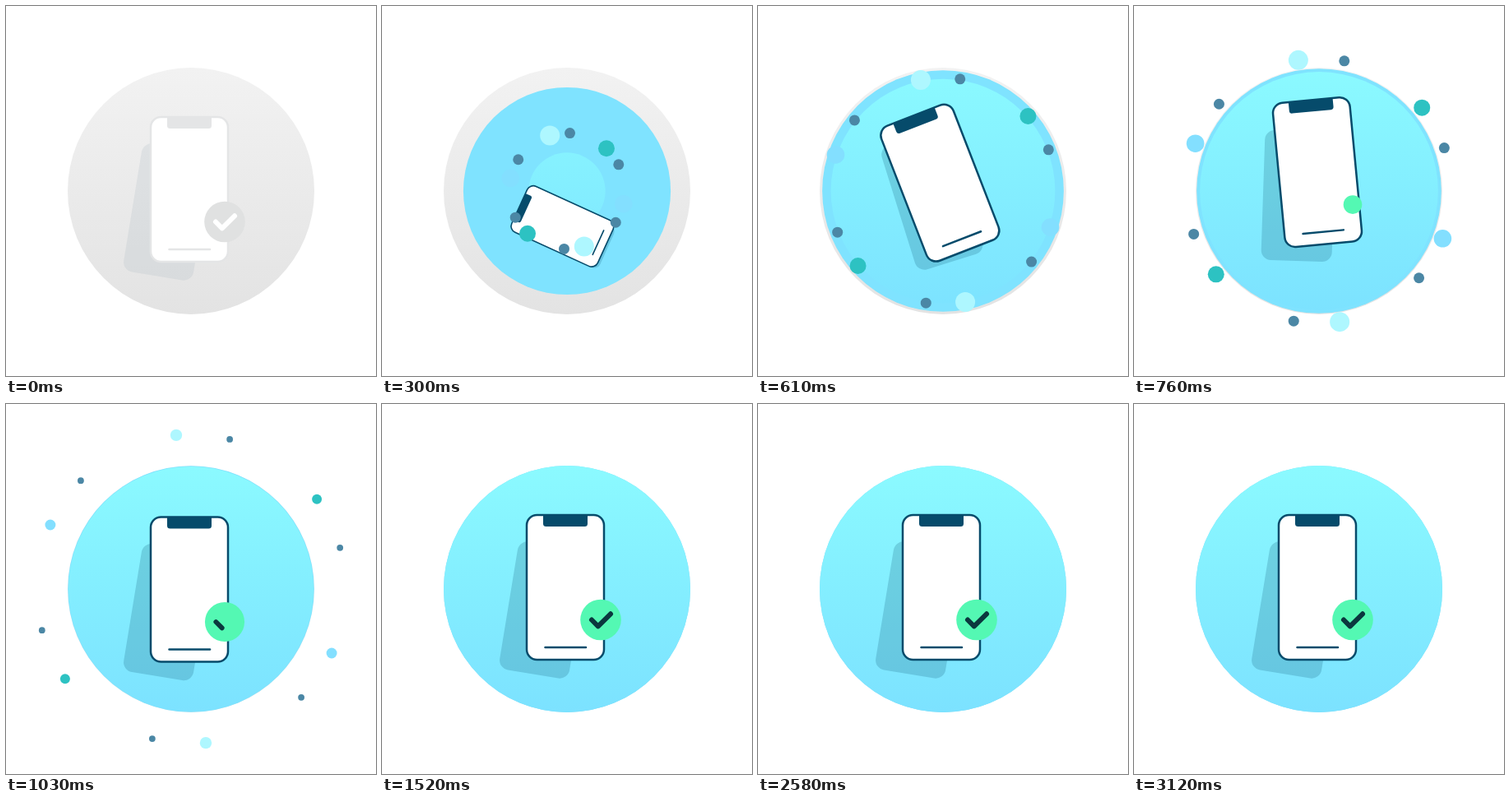
Recreate the animation shown at these times as an HTML page with a canvas. Size 450 by 450 pixels, loop 3210 ms.

```html
<!DOCTYPE html>
<html lang="en">
<head>
<meta charset="utf-8">
<title>Phone check</title>
<style>
html, body { margin: 0; width: 100%; height: 100%; overflow: hidden; background: #fff; }
canvas { display: block; }
</style>
</head>
<body>
<canvas id="stage" width="450" height="450"></canvas>
<script>
const LOOP = 3210;
const C = 225;
const ctx = document.getElementById('stage').getContext('2d');

const COLOR = { ink: '#064b6b', shadow: 'rgba(6,75,107,.2)', badge: '#54f8b3', tick: '#0b383e' };
const GREY = { ink: '#e4e5e6', shadow: 'rgba(170,180,190,.22)', badge: '#e0e1e1', tick: '#fff' };

// Motion curves: [time, value] pairs joined by smooth splines
const PHONE_Y = [[150, 285], [450, 240], [700, 203], [760, 202], [1030, 225.5], [1200, 223]];
const PHONE_TURN = [[150, -80], [450, -42], [760, -5.5], [1000, 0]];
const PHONE_SIZE = [[150, 0], [400, 1]];
const SHADOW_X = [[200, 3], [450, 1.5], [760, -23], [1000, -26.5]];
const SHADOW_Y = [[200, 6], [450, 10], [760, 29], [1000, 27.5]];
const SHADOW_TURN = [[150, -80], [450, -42], [760, 1.8], [1030, 9.3]];
const BADGE_SIZE = [[700, 0], [760, .45], [870, 1.03], [1030, .97], [1110, 1]];
const STREAK = [[340, 0], [440, .65], [600, 0]];

// Half of the ring of dots: angle, radius, colour; the other half is opposite
const DOTS = [
  [-99, 12, '#aef7ff'], [-79, 6.5, '#4b87a5'], [-39, 10, '#2dc2c2'],
  [-19, 6.5, '#4b87a5'], [21, 10.8, '#83dfff'], [41, 6.5, '#4b87a5']
];

const clamp = v => Math.min(1, Math.max(0, v));
const rad = deg => deg * Math.PI / 180;

function curve(keys, t) {
  const last = keys.length - 1;
  if (t <= keys[0][0]) return keys[0][1];
  if (t >= keys[last][0]) return keys[last][1];
  const i = keys.findIndex(k => k[0] > t) - 1;
  const slope = j => j === 0 || j === last ? 0
    : (keys[j + 1][1] - keys[j - 1][1]) / (keys[j + 1][0] - keys[j - 1][0]);
  const [t0, a] = keys[i], [t1, b] = keys[i + 1];
  const d = t1 - t0, u = (t - t0) / d, v = 1 - u;
  return a * (1 + 2 * u) * v * v + b * u * u * (3 - 2 * u)
    + d * u * v * (slope(i) * v - slope(i + 1) * u);
}

function disc(x, y, r, fill) {
  if (r <= 0) return;
  ctx.fillStyle = fill;
  ctx.beginPath();
  ctx.arc(x, y, r, 0, 2 * Math.PI);
  ctx.fill();
}

function box(x, y, w, h, r, fill) {
  ctx.fillStyle = fill;
  ctx.beginPath();
  ctx.roundRect(x, y, w, h, r);
  ctx.fill();
}

function line(points, width, color) {
  ctx.strokeStyle = color;
  ctx.lineWidth = width;
  ctx.beginPath();
  points.forEach(([x, y]) => ctx.lineTo(x, y));
  ctx.stroke();
}

function placed(x, y, turn, size, draw) {
  if (size <= 0) return;
  ctx.save();
  ctx.translate(x, y);
  ctx.rotate(rad(turn));
  ctx.scale(size, size);
  draw();
  ctx.restore();
}

function gradient(top, bottom) {
  const g = ctx.createLinearGradient(0, 75, 0, 375);
  g.addColorStop(0, top);
  g.addColorStop(1, bottom);
  return g;
}

function drawPhone(t, look) {
  const y = curve(PHONE_Y, t), size = curve(PHONE_SIZE, t);

  placed(223 + curve(SHADOW_X, t), y + curve(SHADOW_Y, t), curve(SHADOW_TURN, t), size,
    () => box(-43, -79, 86, 158, 12, look.shadow));

  const streak = curve(STREAK, t);
  if (streak > 0) {
    const color = `rgba(190,248,255,${streak})`;
    line([[174, 288], [168, 319]], 8, color);
    line([[201, 306], [205, 331]], 8, color);
  }

  const x = curve([[450, 219.5], [760, 223]], t);
  placed(x, y, curve(PHONE_TURN, t), size, () => {
    box(-47, -88, 94, 176, 12.5, '#fff');
    ctx.strokeStyle = look.ink;
    ctx.lineWidth = 2.5;
    ctx.stroke();
    box(-27, -88, 54, 14, [0, 0, 3.5, 3.5], look.ink);
    ctx.lineCap = 'round';
    line([[-24.5, 73], [25, 73]], 2.5, look.ink);
    ctx.lineCap = 'butt';
  });

  placed(266, y + 39.5, 0, curve(BADGE_SIZE, t), () => {
    disc(0, 0, 24.8, look.badge);
    const drawn = clamp((t - 960) / 220);
    if (!drawn) return;
    ctx.lineCap = ctx.lineJoin = 'round';
    ctx.setLineDash([33.3 * drawn, 99]);
    line([[-11, 0], [-3.2, 7.8], [12, -7.2]], 6, look.tick);
  });
}

function drawDots(t) {
  const left = clamp((1271 - t) / 1213);
  const dist = 195.7 * (1 - left * left);
  const size = clamp((t - 60) / 200) * clamp((1390 - t) / 600);
  const d = t - 760;
  const turn = .01474 * d - 6.57e-6 * d * d;
  for (const [angle, r, color] of DOTS) {
    const a = rad(angle + turn);
    const dx = dist * Math.cos(a), dy = dist * Math.sin(a);
    disc(C + dx, C + dy, r * size, color);
    disc(C - dx, C - dy, r * size, color);
  }
}

function draw(t) {
  const grow = start => 150 * (1 - Math.exp(-Math.max(0, t - start) / 153));
  ctx.fillStyle = '#fff';
  ctx.fillRect(0, 0, 450, 450);

  disc(C, C, 150, gradient('#f2f2f2', '#e3e3e3'));
  if (t < 600) drawPhone(LOOP, GREY);
  disc(C, C, grow(20), '#7fe3ff');
  disc(C, C, grow(244), gradient('#8bfaff', '#7ce2ff'));
  drawPhone(t, COLOR);
  drawDots(t);
}

function tick() {
  draw(performance.now() % LOOP);
  requestAnimationFrame(tick);
}
draw(0);
requestAnimationFrame(tick);
</script>
</body>
</html>
```
